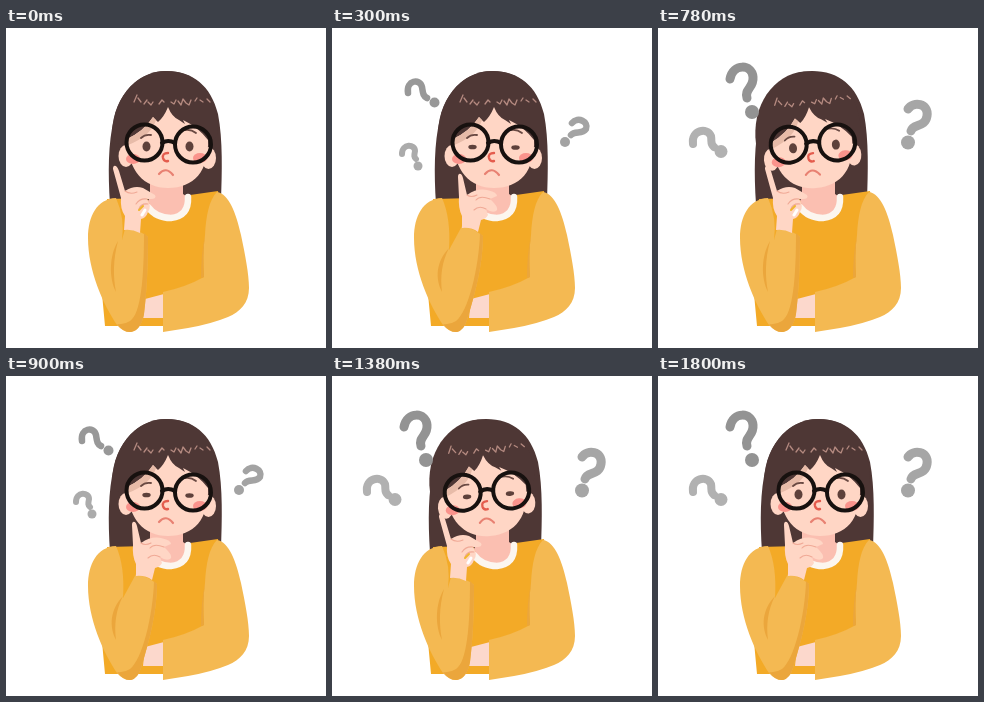
These frames come from a looping animation (320 by 320 pixels, 2100 ms). An HTML page:

```html
<!DOCTYPE html>
<html lang="en">
<head>
<meta charset="utf-8">
<title>Thinking</title>
<style>
  html, body { margin: 0; width: 100%; height: 100%; overflow: hidden; background: #fff; }
  svg { display: block; width: 100%; height: 100%; }
  .line { fill: none; stroke-linecap: round; stroke-linejoin: round; }
  .hair { fill: #4e3735; }
  .skin { fill: #ffd6c5; }
  .sleeve { fill: #f4b952; }
  .shade { fill: #eba63c; }
  .iris { fill: #5e413b; }
  .crease { stroke: #f0a996; stroke-width: 1.1; }
</style>
</head>
<body>
<svg viewBox="0 0 320 320">
  <path id="backHair" class="hair" d="M104 176C102 145 102 115 108 91C115 60 136 43 160 43C187 43 205 58 212 86C217 112 216 145 215 172Z"/>

  <!-- neck and torso -->
  <path fill="#fbbfb1" d="M144 148H177V166L183 170Q184 190 165 191Q145 191 139 176Q144 172 144 166Z"/>
  <path fill="#f3aa27" d="M101 171L141 170Q147 190 165 190Q182 188 184 167L212 163L222 240L200 262L157 270V298H99L95 255Z"/>
  <path class="line" stroke="#fcf6ef" stroke-width="6.5" d="M142 179Q150 190 165 190Q183 188 182 169"/>
  <path fill="#fcd8cc" d="M139 271L158 266V290H137Z"/>

  <!-- folded arm -->
  <path class="sleeve" d="M211 164C223 166 230 185 235 207C239 226 243 246 243 260C243 275 234 284 222 289Q205 296 182 300L157 304V264Q180 259 198 249C197 235 197 221 199 207C200 188 203 172 211 164Z"/>
  <path class="shade" d="M199 207C196 221 195 236 195 250L198 249C197 235 197 221 199 207Z"/>

  <g id="head">
    <path class="hair" d="M106 112C104 72 130 43 160 43C192 43 212 67 212 106L200 122H122Z"/>
    <ellipse class="skin" cx="120" cy="128" rx="7.500" ry="11"/>
    <ellipse class="skin" cx="202.500" cy="130" rx="7.500" ry="11"/>
    <path class="skin" d="M121 111Q138 103 147 89L152 94Q158 89 162 79Q166 89 173 92L179 96L177 92Q192 99 202 112C203 143 188 160 162 160C138 160 122 143 121 111Z"/>
    <path fill="#e7bba8" d="M121 111Q138 103 147 89L150 92Q145 108 122 117Z"/>
    <ellipse cx="127" cy="131" rx="7" ry="5" fill="#fa938c"/>
    <ellipse cx="194" cy="130" rx="7" ry="5" fill="#fa938c"/>
    <path class="line" stroke="#b58a80" stroke-width="1.3" d="M128 74L131 67M132 70L135 74M138 76L141 72M142 74L145 77L147 74M153 76L156 72L158 74M165 74L168 76L170 72M172 73L175 77L177 71L180 75L183 77L185 72M189 73L191 70M194 72L197 74M201 71L204 74"/>
    <path class="line" stroke="#6a4a43" stroke-width="1.8" d="M135 110Q139 106 145 107M179 102Q185 101 190 105"/>
    <g id="eyes">
      <g id="openEyes" class="iris">
        <ellipse cx="140.500" cy="118.500" rx="4" ry="5"/>
        <ellipse cx="183.500" cy="118.500" rx="4" ry="5"/>
      </g>
      <g id="sleepyEyes" class="iris">
        <ellipse cx="140.500" cy="119" rx="4.200" ry="2.300"/>
        <ellipse cx="183.500" cy="119.500" rx="4.200" ry="2.300"/>
      </g>
    </g>
    <path class="line" stroke="#e45c4d" stroke-width="2.4" d="M162 125Q156 125 157 130Q158 134 162 133"/>
    <path class="line" stroke="#e88172" stroke-width="2.2" d="M153 146Q160 138 167 147"/>
    <g class="line" stroke="#17110f" stroke-width="4">
      <circle cx="138.500" cy="114.500" r="18"/>
      <circle cx="187" cy="116.500" r="18"/>
      <path d="M156 115Q162 111 169 115"/>
    </g>
  </g>

  <g id="armAway">
    <path class="sleeve" d="M110 170C91 171 82 188 82 210C82 243 97 276 111 297Q118 305 125 304Q135 302 138 286C141 262 142 236 142 209Q131 200 119 201L116 212Q119 190 110 170Z"/>
    <path class="shade" d="M112 213C103 228 103 250 110 264C107 248 107 232 112 213Z"/>
    <path class="shade" d="M138 205L142 209C142 236 141 262 138 286Q135 302 125 304Q118 305 111 296Q118 297 124 293C135 286 138 250 138 205Z"/>
    <path class="skin" d="M107 141C107 136 111 137 113 143L119 163Q128 157 137 160L149 167Q151 171 145 171L141 171Q146 178 142 184Q140 190 135 191L134 205Q126 201 118 202L119 188Q114 181 115 170Z"/>
    <path class="line crease" d="M119 163Q124 167 131 164M141 171Q134 170 130 176M142 176Q135 175 133 181"/>
    <path class="line" stroke="#fff" stroke-width="3" d="M136 187L139 182"/>
    <path class="line" stroke="#f0b62e" stroke-width="2" d="M133 182L137 178"/>
  </g>

  <g id="armNear">
    <path class="sleeve" d="M110 170C91 171 82 188 82 210C82 243 97 276 111 297Q118 305 125 304Q132 302 135 292C143 266 151 236 151 208Q141 200 130 198L117 222Q119 190 110 170Z"/>
    <path class="shade" d="M117 220C104 234 103 250 110 264C108 248 110 234 117 220Z"/>
    <path class="shade" d="M148 205L151 208C151 236 143 266 135 292Q132 302 125 304Q118 305 111 296Q118 297 124 293C136 284 147 240 148 205Z"/>
    <path class="skin" d="M126 149C126 144 130 145 131 150L135 167Q145 160 155 162Q165 164 165 168L158 171Q168 180 164 183Q160 185 154 181L156 187Q154 191 149 192L146 204Q139 199 130 200L130 188Q126 180 127 169Z"/>
    <path class="line crease" d="M135 167Q139 170 145 167M158 171Q148 167 144 172M154 181Q147 177 142 182"/>
  </g>

  <g id="smallMarks"></g>
  <g id="bigMarks"></g>
</svg>
<script>
  const STEP = 300;
  const byId = id => document.getElementById(id);

  const mark = (path, x, y, r, width, color) =>
    `<path class="line" d="${path}" stroke="${color}" stroke-width="${width}"/>
     <circle cx="${x}" cy="${y}" r="${r}" fill="${color}"/>`;

  byId('smallMarks').innerHTML =
    mark('M76 65C74 52 88 50 90 59C91 65 91 68 95 70', 102.5, 74.5, 5, 6.5, '#989898') +
    mark('M70 126C70 115 83 116 83 123C82 128 82 129 84 131', 86, 138, 4.5, 6, '#ababab') +
    mark('M240 95C246 88 257 94 254 101C250 107 243 102 239 107', 233, 114, 5, 6.5, '#a3a3a3');

  byId('bigMarks').innerHTML =
    mark('M72 51C75 35 94 36 95 49C96 60 86 61 89 70', 94, 84, 7, 9, '#939393') +
    mark('M35 116C33 102 49 99 53 108C54 114 52 116 56 119', 63, 123.5, 6.5, 8, '#b1b1b1') +
    mark('M250 81C255 73 271 75 269 88C267 100 255 95 253 103', 250, 114.5, 7, 9, '#a6a6a6');

  // One pose per step.
  const poses = [
    { arm: 'away', marks: 'none' },
    { arm: 'near', marks: 'small', sleepy: true },
    { arm: 'away', marks: 'big', tilted: true },
    { arm: 'near', marks: 'small', sleepy: true },
    { arm: 'away', marks: 'big', tilted: true, sleepy: true },
    { arm: 'near', marks: 'small' },
    { arm: 'near', marks: 'big' }
  ];

  const show = (id, visible) =>
    byId(id).setAttribute('display', visible ? 'inline' : 'none');
  const move = (id, transform) => byId(id).setAttribute('transform', transform);

  function draw(time) {
    const pose = poses[Math.floor(time / STEP) % poses.length];
    show('armAway', pose.arm === 'away');
    show('armNear', pose.arm === 'near');
    show('smallMarks', pose.marks === 'small');
    show('bigMarks', pose.marks === 'big');
    show('openEyes', !pose.sleepy);
    show('sleepyEyes', pose.sleepy);
    move('head', pose.tilted ? 'rotate(-5 160 205)' : '');
    move('eyes', pose.tilted ? 'translate(2 0)' : '');
    move('backHair', pose.tilted ? 'translate(-6 0)' : '');
  }

  const start = performance.now();
  function tick() {
    draw(performance.now() - start);
    requestAnimationFrame(tick);
  }
  tick();
</script>
</body>
</html>
```
